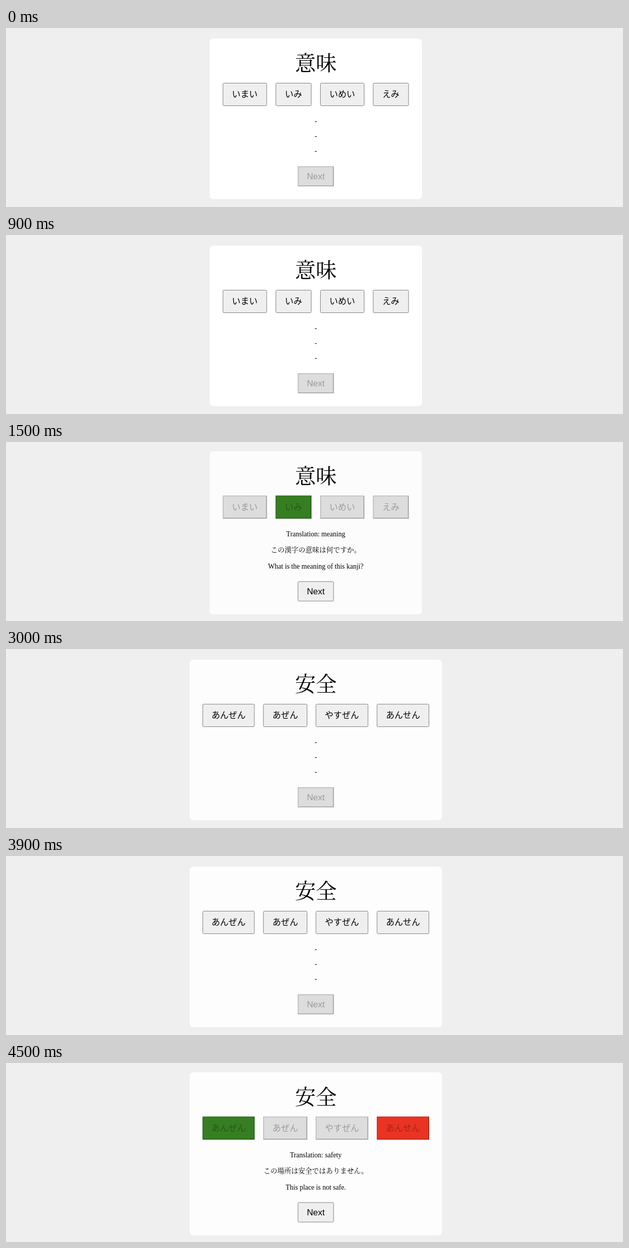
Recreate the animation shown at these times as an HTML page. Size 1200 px wide and 349 px high, loop 6 s.

```html
<!DOCTYPE html>
<html lang="ja">
<head>
<meta charset="utf-8">
<title>Kanji quiz</title>
<style>
  html, body { margin: 0; width: 100%; height: 100%; overflow: hidden; background: #efefef; }
  svg { display: block; width: 1200px; height: 349px; }
  text { text-anchor: middle; }
  .kanji { font: 40.6px "Noto Serif CJK JP", "Noto Sans CJK JP", "Noto Sans CJK", serif; }
  .line { font: 13.52px "Liberation Serif", "Noto Serif CJK JP", "Noto Sans CJK JP", "Noto Sans CJK", serif; }
  .kana { font: 500 16.6px "Noto Sans CJK JP", "Noto Sans CJK", sans-serif; }
  .next { font: 16.9px "Liberation Sans", sans-serif; }
</style>
</head>
<body>
<svg id="stage" viewBox="0 0 1200 349"></svg>
<script>
const stage = document.getElementById('stage');
const STEP = 1500;
const CENTER = 602.5;
const GREY = '#dddddd', GREEN = '#367e22', RED = '#ea3323';

// Each option: label, left edge, width, colour once answered.
const questions = [
  {
    kanji: '意味', cardX: 396, cardW: 413, fills: ['#ffffff', '#fcfcfc'],
    options: [
      ['いまい', 421.5, 86, GREY],
      ['いみ', 524.3, 69.8, GREEN],
      ['いめい', 611, 86, GREY],
      ['えみ', 713.6, 69.8, GREY]
    ],
    lines: ['Translation: meaning', 'この漢字の意味は何ですか。', 'What is the meaning of this kanji?']
  },
  {
    kanji: '安全', cardX: 357, cardW: 491, fills: ['#fdfdfd', '#fdfdfd'],
    options: [
      ['あんぜん', 382.2, 101.3, GREEN],
      ['あぜん', 500.2, 85.8, GREY],
      ['やすぜん', 602.3, 102.2, GREY],
      ['あんせん', 721.2, 101.8, RED]
    ],
    lines: ['Translation: safety', 'この場所は安全ではありません。', 'This place is not safe.']
  }
];

const text = (cls, x, y, label, opacity = 1) =>
  `<text class="${cls}" x="${x}" y="${y}" fill-opacity="${opacity}">${label}</text>`;

function button(cls, label, x, y, w, h, baseline, enabled, fill = GREY) {
  const caption = text(cls, x + w / 2, baseline, label, enabled ? 1 : 0.3);
  if (enabled) {
    return `<rect x="${x + 0.5}" y="${y + 0.5}" width="${w - 1}" height="${h - 1}" rx="2"
      fill="#efefef" stroke="#808080"/>` + caption;
  }
  // Outset bevel: lighter top and left, darker bottom and right.
  const b = 1.7;
  return `<rect x="${x}" y="${y}" width="${w}" height="${h}" fill="${fill}"/>
    <path d="M${x} ${y + h}V${y}h${w}l${-b} ${b}H${x + b}V${y + h - b}z" fill-opacity=".15"/>
    <path d="M${x} ${y + h}h${w}V${y}l${-b} ${b}V${y + h - b}H${x + b}z" fill-opacity=".28"/>` + caption;
}

function scene(q, answered) {
  const top = answered ? 17.9 : 20.7;
  const bottom = answered ? 336 : 333.7;
  const shift = answered ? -2.6 : 0;
  const nextY = answered ? 271.6 : 269.6;
  const lines = answered ? q.lines : ['-', '-', '-'];
  const baselines = answered ? [183.5, 215, 246.5] : [186, 215, 244];
  return `<rect width="1200" height="349" fill="#efefef"/>
    <rect x="${q.cardX}" y="${top}" width="${q.cardW}" height="${bottom - top}" rx="7"
      fill="${q.fills[+answered]}"/>` +
    text('kanji', CENTER, 83.2 + shift, q.kanji) +
    q.options.map(([label, x, w, fill]) =>
      button('kana', label, x, 107 + shift, w, 45, 135.2 + shift, !answered, fill)).join('') +
    lines.map((line, i) => text('line', CENTER, baselines[i], line)).join('') +
    button('next', 'Next', 567.4, nextY, 70.2, 39, nextY + 25.3, answered);
}

let shown = -1;
function update(now) {
  const step = Math.floor(now / STEP) % 4;
  if (step !== shown) {
    shown = step;
    stage.innerHTML = scene(questions[step >> 1], step % 2 === 1);
  }
}

const start = performance.now();
function tick() {
  update(performance.now() - start);
  requestAnimationFrame(tick);
}
tick();
</script>
</body>
</html>
```
